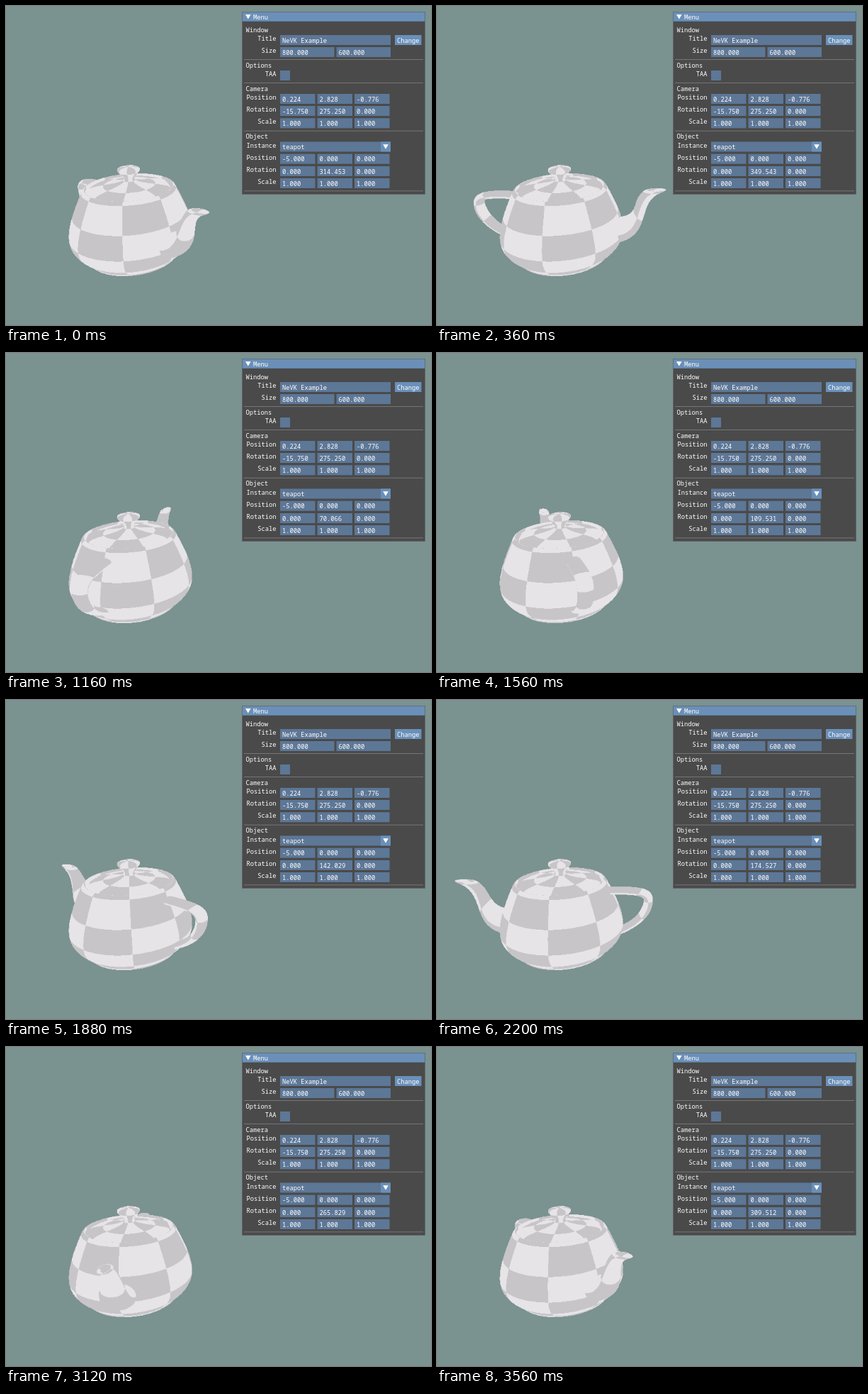
An HTML page with a canvas that plays this animation: 600x450 px, repeating every 3.6 s.

```html
<!DOCTYPE html>
<html lang="en">
<head>
<meta charset="utf-8">
<title>Teapot viewer</title>
<style>
html, body { margin: 0; width: 100%; height: 100%; overflow: hidden; background: #7a9290; }
canvas, svg { position: absolute; left: 0; top: 0; width: 600px; height: 450px; }
text { font: 8.75px "Noto Sans Mono", monospace; fill: #fff; white-space: pre; }
</style>
</head>
<body>
<canvas id="view" width="600" height="450"></canvas>
<svg id="ui" viewBox="0 0 600 450"></svg>
<script>
const LOOP = 3600, STEP = 40;
const KEYS = [[0, 314.453], [360, 349.543], [800, 394.547], [1560, 469.531],
  [2200, 534.527], [2720, 586.117], [3560, 669.512], [3600, 674.453]];
const BACK = [122, 146, 144], LIGHT = [230, 228, 231], DARK = [199, 197, 200];
const W = 800, H = 600, FOCAL = H / 2 / Math.tan(Math.PI / 8);
const SIZE = 0.433, RAD = Math.PI / 180;

// ---- teapot mesh from Bezier patches ----
const bez = (p, t) => {
  const s = 1 - t;
  return p[0] * s * s * s + 3 * p[1] * s * s * t + 3 * p[2] * s * t * t + p[3] * t * t * t;
};
const pos = [], uv = [], tris = [];

function addSurface(fn, nu, nv, u1, v0) {
  const base = pos.length / 3;
  for (let j = 0; j <= nv; j++) for (let i = 0; i <= nu; i++) {
    const u = u1 * i / nu, v = j / nv;
    pos.push(...fn(u, v).map(c => c * SIZE));
    uv.push(u * 2, (v0 + v) * 2);
  }
  for (let j = 0; j < nv; j++) for (let i = 0; i < nu; i++) {
    const a = base + j * (nu + 1) + i, b = a + nu + 1;
    tris.push(a, a + 1, b, a + 1, b + 1, b);
  }
}

// radius and height of each turned section
const LATHE = [
  [[0, .8, 0, .2], [3.15, 3.15, 2.85, 2.7]],
  [[.2, .4, 1.3, 1.3], [2.7, 2.55, 2.55, 2.4]],
  [[1.4, 1.3375, 1.4375, 1.5], [2.4, 2.53125, 2.53125, 2.4]],
  [[1.5, 1.75, 2, 2], [2.4, 1.875, 1.35, .9]],
  [[2, 2, 1.5, 1.5], [.9, .45, .225, .15]],
  [[1.5, 1.5, 1.425, 0], [.15, .075, 0, 0]]
];
LATHE.forEach(([r, y], k) => addSurface((u, v) => {
  const a = u * Math.PI / 2, q = bez(r, v);
  return [q * Math.cos(a), bez(y, v), q * Math.sin(a)];
}, 64, 12, 4, k));

// rows: inner x, inner y, outer x, outer y, half width
const HANDLE = [[-1.6, 2.025, -1.5, 2.25, .3], [-2.3, 2.025, -2.5, 2.25, .3],
  [-2.7, 2.025, -3, 2.25, .3], [-2.7, 1.8, -3, 1.8, .3], [-2.7, 1.575, -3, 1.35, .3],
  [-2.5, 1.125, -2.65, .9375, .3], [-2, .9, -1.9, .6, .3]];
const SPOUT = [[1.7, 1.425, 1.7, .6, .66], [2.6, 1.425, 3.1, .825, .66],
  [2.3, 2.1, 2.4, 2.025, .25], [2.7, 2.4, 3.3, 2.4, .25], [2.8, 2.475, 3.525, 2.49375, .25],
  [2.9, 2.475, 3.45, 2.5125, .15], [2.8, 2.4, 3.2, 2.4, .15]];
for (const rows of [HANDLE, SPOUT]) for (const k of [0, 3]) for (const side of [-1, 1]) {
  const part = rows.slice(k, k + 4);
  addSurface((u, v) => {
    const [xi, yi, xo, yo, w] = [0, 1, 2, 3, 4].map(c => bez(part.map(r => r[c]), v));
    return [bez([xi, xi, xo, xo], u), bez([yi, yi, yo, yo], u), side * bez([0, w, w, 0], u)];
  }, 12, 14, 1, side > 0 ? 1 : 0);
}

// ---- camera and rasteriser ----
const CAM = [0.224, 2.828, -0.776], PITCH = -15.75 * RAD, YAW = 275.25 * RAD, SHIFT = -5;
const cp = Math.cos(PITCH), sp = -Math.sin(PITCH);
const fx = Math.sin(YAW), fz = -Math.cos(YAW);
const off = document.createElement('canvas');
off.width = W; off.height = H;
const offCtx = off.getContext('2d'), img = offCtx.createImageData(W, H);
const px = new Uint32Array(img.data.buffer), depth = new Float32Array(W * H);
const pack = c => (255 << 24 | c[2] << 16 | c[1] << 8 | c[0]) >>> 0;
const tones = [pack(LIGHT), pack(DARK)], backTone = pack(BACK);
const n = pos.length / 3, sx = new Float64Array(n), sy = new Float64Array(n), inv = new Float64Array(n);
const ctx = document.getElementById('view').getContext('2d');

function project(deg) {
  const c = Math.cos(deg * RAD), s = Math.sin(deg * RAD);
  for (let i = 0; i < n; i++) {
    const x = pos[3 * i], y = pos[3 * i + 1] - CAM[1], z = pos[3 * i + 2];
    const wx = SHIFT - x * s - z * c - CAM[0], wz = z * s - x * c - CAM[2];
    const ahead = wx * fx + wz * fz, right = wz * fx - wx * fz;
    inv[i] = 1 / (ahead * cp - y * sp);
    sx[i] = W / 2 + FOCAL * right * inv[i];
    sy[i] = H / 2 - FOCAL * (y * cp + ahead * sp) * inv[i];
  }
}

function fillTri(a, b, c) {
  const ax = sx[a], ay = sy[a], bx = sx[b] - ax, by = sy[b] - ay, cx = sx[c] - ax, cy = sy[c] - ay;
  const area = bx * cy - by * cx;
  if (Math.abs(area) < 1e-9) return;
  const x0 = Math.ceil(ax + Math.min(0, bx, cx) - .5), x1 = ax + Math.max(0, bx, cx) - .5;
  const y0 = Math.ceil(ay + Math.min(0, by, cy) - .5), y1 = ay + Math.max(0, by, cy) - .5;
  for (let y = y0; y <= y1; y++) for (let x = x0; x <= x1; x++) {
    const dx = x + .5 - ax, dy = y + .5 - ay;
    const wb = (dx * cy - dy * cx) / area, wc = (bx * dy - by * dx) / area, wa = 1 - wb - wc;
    if (wa < 0 || wb < 0 || wc < 0) continue;
    const pa = wa * inv[a], pb = wb * inv[b], pc = wc * inv[c], d = pa + pb + pc, at = y * W + x;
    if (d <= depth[at]) continue;
    depth[at] = d;
    const u = (pa * uv[2 * a] + pb * uv[2 * b] + pc * uv[2 * c]) / d;
    const v = (pa * uv[2 * a + 1] + pb * uv[2 * b + 1] + pc * uv[2 * c + 1]) / d;
    px[at] = tones[(Math.floor(u) + Math.floor(v)) & 1];
  }
}

function drawPot(deg) {
  px.fill(backTone);
  depth.fill(0);
  project(deg);
  for (let i = 0; i < tris.length; i += 3) fillTri(tris[i], tris[i + 1], tris[i + 2]);
  offCtx.putImageData(img, 0, 0);
  ctx.drawImage(off, 0, 0, 600, 450);
}

// ---- panel ----
const ui = document.getElementById('ui');
function el(tag, attrs, str) {
  const e = document.createElementNS('http://www.w3.org/2000/svg', tag);
  for (const k in attrs) e.setAttribute(k, attrs[k]);
  if (str) e.textContent = str;
  return ui.appendChild(e);
}
const rect = (x, y, width, height, fill) => el('rect', { x, y, width, height, fill });
const text = (x, y, str, anchor = 'start') => el('text', { x, y, 'text-anchor': anchor }, str);
const FIELD = '#5d7797', BUTTON = '#6a90b9';
const arrow = (x, y) => el('path', { d: `M${x} ${y}h7.6l-3.8 6.6z`, fill: '#fff' });
const rule = y => rect(336, y, 253, .8, '#808080');

function row(y, label, values, xs, w) {
  text(381.5, y + 8, label, 'end');
  return values.map((v, i) => {
    rect(xs[i], y, w, 14, FIELD);
    return text(xs[i] + 3, y + 10.6, v);
  });
}
const row3 = (y, label, ...v) => row(y, label, v, [387, 439.5, 492], 49.5);

rect(333, 8, 259, 258, '#6a6a70');
rect(333.7, 8.7, 257.6, 256.6, '#4a4a4a');
rect(333.7, 8.7, 257.6, 13, BUTTON);
arrow(338, 12);
text(349, 18.5, 'Menu');
text(338.5, 36.5, 'Window');
row(41, 'Title', ['NeVK Example'], [387], 156);
rect(549, 41, 37.5, 14, BUTTON);
text(552, 51.6, 'Change');
row(58, 'Size', ['800.000', '600.000'], [387, 466.5], 76.5);
rule(75.2);
text(338.5, 86.8, 'Options');
row(91, 'TAA', [], [], 0);
rect(387, 91, 14, 14, FIELD);
rule(108.2);
text(338.5, 119.8, 'Camera');
row3(124, 'Position', '0.224', '2.828', '-0.776');
row3(141, 'Rotation', '-15.750', '275.250', '0.000');
row3(158.3, 'Scale', '1.000', '1.000', '1.000');
rule(175.8);
text(338.5, 187.4, 'Object');
row(191.5, 'Instance', ['teapot'], [387], 156);
rect(529, 191.5, 14, 14, BUTTON);
arrow(532.2, 195.2);
row3(208.7, 'Position', '-5.000', '0.000', '0.000');
const spin = row3(226, 'Rotation', '0.000', '', '0.000')[1];
row3(243, 'Scale', '1.000', '1.000', '1.000');
rule(260.5);

function angleAt(t) {
  const i = KEYS.findIndex(k => k[0] > t), [t0, a0] = KEYS[i - 1], [t1, a1] = KEYS[i];
  return a0 + (a1 - a0) * (t - t0) / (t1 - t0);
}

let last = -1;
function frame(now) {
  const t = Math.floor(now % LOOP / STEP) * STEP;
  if (t !== last) {
    last = t;
    const deg = angleAt(t) % 360;
    drawPot(deg);
    spin.textContent = deg.toFixed(3);
  }
  requestAnimationFrame(frame);
}
frame(0);
</script>
</body>
</html>
```
